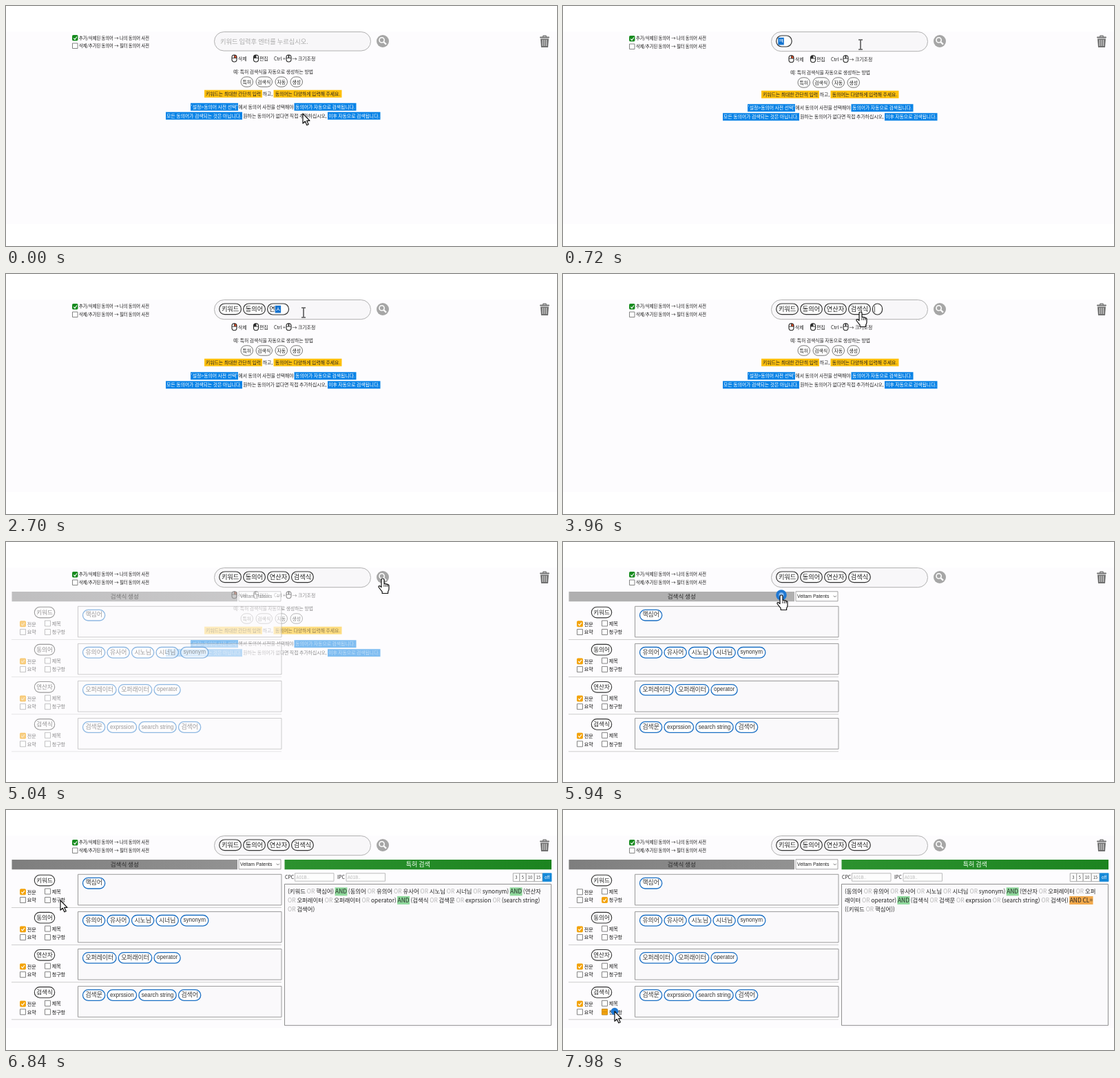
Animation of 800x348 px, one loop 8000 ms. Source, as an HTML page with a canvas:

```html
<!DOCTYPE html>
<html lang="ko">
<head>
<meta charset="utf-8">
<title>검색식 생성</title>
<style>
html, body { margin: 0; width: 100%; height: 100%; overflow: hidden; background: #fff; }
canvas { display: block; width: 800px; height: 348px; }
</style>
</head>
<body>
<canvas id="stage"></canvas>
<script>
const LOOP = 8000;
const KR = '"Noto Sans CJK KR", "Noto Sans CJK", sans-serif';
const ARIAL = '"Liberation Sans", "Noto Sans CJK KR", sans-serif';
const canvas = document.getElementById('stage');
const g = canvas.getContext('2d');
const dpr = window.devicePixelRatio || 1;
canvas.width = 800 * dpr;
canvas.height = 348 * dpr;

// Each word as the states of its syllables while it is typed.
const words = [
  { start: 720, step: 105, keys: 'ㅋ 키 키ㅇ 키우 키워 키워ㄷ 키워드' },
  { start: 1540, step: 100, keys: 'ㄷ 도 동 동ㅇ 동으 동의 동의ㅇ 동의어' },
  { start: 2400, step: 85, keys: 'ㅇ 여 연 연ㅅ 연사 연산 연산ㅈ 연산자' },
  { start: 3140, step: 72, keys: 'ㄱ 거 검 검ㅅ 검새 검색 검색ㅅ 검색시 검색식' }
].map(w => ({ ...w, keys: w.keys.split(' ') }));

const FOCUS = 600, SEARCH = 4600, MAKE = 5800, CLAIM = 6930, LAST = 7920;
const clicks = [[SEARCH, 547, 53], [MAKE, 317, 77], [CLAIM, 79, 131], [LAST, 75, 292]];
const path = [
  [0, 431, 156], [80, 431, 156], [520, 432, 56], [4220, 432, 56], [4540, 547, 54],
  [5120, 547, 54], [5700, 317, 78], [6060, 317, 78], [6760, 79, 131],
  [7180, 79, 131], [7820, 75, 292], [8000, 75, 292]
];

const rows = [
  ['키워드', ['핵심어']],
  ['동의어', ['유의어', '유사어', '시노님', '시너님', 'synonym']],
  ['연산자', ['오퍼레이터', '오퍼래이터', 'operator']],
  ['검색식', ['검색문', 'exprssion', 'search string', '검색어']]
];

const query = [
  '(키워드 OR 핵심어) AND (동의어 OR 유의어 OR 유사어 OR 시노님 OR 시너님 OR synonym) AND (연산자',
  'OR 오퍼레이터 OR 오퍼래이터 OR operator) AND (검색식 OR 검색문 OR exprssion OR (search string)',
  'OR 검색어)'
];
const claimQuery = [
  '(동의어 OR 유의어 OR 유사어 OR 시노님 OR 시너님 OR synonym) AND (연산자 OR 오퍼레이터 OR 오퍼',
  '래이터 OR operator) AND (검색식 OR 검색문 OR exprssion OR (search string) OR 검색어) AND CL=',
  '((키워드 OR 핵심어))'
];

const clamp = v => Math.max(0, Math.min(1, v));
const ramp = (t, a, b) => clamp((t - a) / (b - a));
const ease = v => v * v * (3 - 2 * v);

function setFont(size, family = KR, weight = 400) {
  g.font = `${weight} ${size}px ${family}`;
}

function text(s, x, y, size, { color = '#222', align = 'left', family = KR, weight = 400 } = {}) {
  setFont(size, family, weight);
  g.fillStyle = color;
  g.textAlign = align;
  g.textBaseline = 'middle';
  g.fillText(s, x, y);
}

function box(x, y, w, h, fill, stroke, r = 0, line = 1) {
  g.beginPath();
  g.roundRect(x, y, w, h, r);
  if (fill) { g.fillStyle = fill; g.fill(); }
  if (stroke) { g.strokeStyle = stroke; g.lineWidth = line; g.stroke(); }
}

function lines(points, color, width) {
  g.beginPath();
  points.forEach(([x, y], i) => i ? g.lineTo(x, y) : g.moveTo(x, y));
  g.strokeStyle = color;
  g.lineWidth = width;
  g.stroke();
}

function disc(x, y, r, color) {
  g.beginPath();
  g.arc(x, y, r, 0, 7);
  g.fillStyle = color;
  g.fill();
}

function check(x, y, on, color, size = 8) {
  box(x + .5, y + .5, size, size, on ? color : '#fff', on ? color : '#777', on ? 1 : 0, .9);
  if (on) lines([[x + 2.2, y + 4.6], [x + 4, y + 6.5], [x + 7, y + 2.5]], '#fff', 1.2);
}

function withAlpha(alpha, draw) {
  if (alpha <= 0) return;
  g.save();
  g.globalAlpha = alpha;
  draw();
  g.restore();
}

function drawTop(t) {
  const shift = t < words[0].start ? 0 : 1;
  check(96, 42 + shift, true, '#148a1c', 7.5);
  check(96, 53.5 + shift, false, '', 7.5);
  const bold = { weight: 500, color: '#111' };
  text('추가/삭제된 동의어 → 나의 동의어 사전', 106, 46.3 + shift * .6, 6.25, bold);
  text('삭제/추가된 동의어 → 필터 동의어 사전', 106, 58 + shift * .4, 6.25, bold);

  box(302.5, 37.5, 227, 27.5 + shift * .7, '#f8f7f9', '#a9a9a9', 14, .9);
  if (t < FOCUS) text('키워드 입력후 엔터를 누르십시오.', 311, 51, 9.25, { color: '#aaa' });
  drawKeywords(t);

  disc(547, 51, 9, '#a6a6a6');
  g.beginPath();
  g.arc(545.6, 49.4, 3.6, 0, 7);
  g.strokeStyle = '#fff';
  g.lineWidth = 1.6;
  g.stroke();
  lines([[548.4, 52.2], [552, 55.6]], '#fff', 2.2);
  drawTrash();
}

function drawTrash() {
  const c = '#707070';
  box(775, 44.5, 14, 2, c, null, 1);
  lines([[779.5, 45], [780, 43.2], [784, 43.2], [784.5, 45]], c, 1.2);
  g.beginPath();
  g.moveTo(776, 47.5);
  g.lineTo(788, 47.5);
  g.lineTo(787, 60);
  g.lineTo(777, 60);
  g.fillStyle = c;
  g.fill();
  for (const x of [779.3, 782, 784.7]) lines([[x, 49], [x, 58]], '#f4f4f4', .9);
}

function drawKeywords(t) {
  if (t < FOCUS) return;
  let x = 309.7;
  for (const { start, step, keys } of words) {
    const k = Math.floor((t - start) / step);
    if (k < 0) break;
    const s = keys[Math.min(k, keys.length - 1)];
    setFont(9.2);
    const w = g.measureText(s).width;
    if (k < keys.length + 1) return drawEdit(x, s, w, t);
    box(x, 43, w + 6.4, 15.6, '#fdfdfd', '#333', 7.8, 1.2);
    text(s, x + 3.2, 50.5, 9.2);
    x += w + 9.6;
  }
  if (t < SEARCH) drawEdit(x, '', 0, t);
}

function drawEdit(x, s, w, t) {
  box(x, 43, w + 14, 16, '#fdfdfd', '#333', 7.8, 1.2);
  if (!s) {
    if (t % 1000 < 530 || t > 3800) lines([[x + 3, 46.5], [x + 3, 55.5]], '#333', .8);
    return;
  }
  const last = s.slice(-1);
  const lw = g.measureText(last).width;
  text(s, x + 2.6, 51, 9.2);
  box(x + 2.6 + w - lw, 45.8, lw, 10.6, '#1473cf');
  text(last, x + 2.6 + w - lw, 51, 9.2, { color: '#fff' });
}

function mouse(x, y, part, color) {
  g.save();
  g.beginPath();
  g.roundRect(x, y, 7, 10, 3.4);
  g.clip();
  box(x, y, 7, 10, '#fff');
  if (part === 'left') box(x, y, 3.5, 4.4, color);
  if (part === 'right') box(x + 3.5, y, 3.5, 4.4, color);
  g.restore();
  box(x, y, 7, 10, null, '#222', 3.4, 1.1);
  lines([[x, y + 4.4], [x + 7, y + 4.4]], '#222', .8);
  lines([[x + 3.5, y], [x + 3.5, y + 4.4]], '#222', part === 'wheel' ? 1.6 : .8);
}

function drawHelp(t) {
  const d = t < words[0].start ? 0 : 1;
  const mid = { align: 'center' };
  mouse(328, 71 + d * .7, 'right', '#e0522d');
  text('삭제', 337, 76.3 + d * .7, 6.9);
  mouse(359.5, 71 + d * .7, 'left', '#333');
  text('편집', 368, 76.3 + d * .7, 6.9);
  text('Ctrl +', 389, 76.3 + d * .7, 6.9);
  mouse(407, 71 + d * .7, 'wheel');
  text('→ 크기조정', 415.5, 76.3 + d * .7, 6.9);
  text('예: 특허 검색식을 자동으로 생성하는 방법', 388, 95 + d, 6.8, mid);
  [['특허', 341, 17.5], ['검색식', 363, 23.5], ['자동', 391, 17.5], ['생성', 413, 17.5]].forEach(([s, x, w]) => {
    box(x, 102.8 + d, w, 14.4, '#fdfdfd', '#555', 7.2, .8);
    text(s, x + w / 2, 110 + d, 6.8, mid);
  });
  const mark = (s, x, y, w, fill, color = '#222') => {
    if (fill) box(x, y - 5.5, w, 11, fill);
    text(s, x + w / 2, y, 6.85, { align: 'center', color });
  };
  const y1 = 127.3 + d, y2 = 146.3 + d * 1.5, y3 = 159.3 + d * 1.5;
  const blue = '#0983e6', gold = '#ffc10d';
  mark('키워드는 최대한 간단히 입력', 288, y1, 84, gold);
  mark('하고,', 372, y1, 16);
  mark('동의어는 다양하게 입력해 주세요.', 388.5, y1, 99, gold);
  mark("'설정>동의어 사전 선택'", 268, y2, 69, blue, '#fff');
  mark('에서 동의어 사전을 선택해야', 337, y2, 81);
  mark('동의어가 자동으로 검색됩니다.', 418.5, y2, 90, blue, '#fff');
  mark('모든 동의어가 검색되는 것은 아닙니다.', 232, y3, 111, blue, '#fff');
  mark('원하는 동의어가 없다면 직접 추가하십시오,', 344, y3, 122);
  mark('이후 자동으로 검색됩니다.', 467, y3, 76.5, blue, '#fff');
}

function drawHeader(x, w, from, to, label, color, size) {
  const grad = g.createLinearGradient(x, 0, x + w, 0);
  grad.addColorStop(0, from);
  grad.addColorStop(1, to);
  box(x, 72, w, 14.3, grad);
  text(label, x + w / 2, 79, size, { align: 'center', color });
}

function drawRow(i, t) {
  const [name, chips] = rows[i];
  const y = 54.1 * i;
  box(41.3, 94.3 + y, 29.4, 15.6, '#fff', '#333', 7.8, 1.1);
  text(name, 56, 101.8 + y, 8.5, { align: 'center' });
  const claimed = i === 0 && t >= CLAIM + 110;
  const pending = i === 3 && t >= LAST + 30;
  const opts = [['전문', 20, 114.3, !claimed], ['제목', 56, 113.5, false],
    ['요약', 20, 126, false], ['청구항', 56, 126, claimed]];
  for (const [s, x, cy, on] of opts) {
    check(x, cy + y, on, '#f3a30b');
    text(s, x + 10.7, cy + 4.6 + y, 7, { weight: 500, color: '#111' });
  }
  if (pending) {
    box(56.5, 126.5 + y, 8, 8, '#f3a30b', '#d98f05', 0, .9);
    for (const x of [58.5, 60.5, 62.5]) disc(x, 130.5 + y, .5, '#8a6420');
  }
  box(104.5, 93.3 + y, 295.5, 44.6, '#faf9fb', '#9a9a9a', 0, 1);
  let x = 111.5;
  for (const s of chips) {
    const size = /[a-z]/.test(s) ? 8.15 : 8.85;
    setFont(size, ARIAL);
    const w = g.measureText(s).width + 7.8;
    box(x, 98.4 + y, w, 15.6, '#fff', '#1a6fc4', 7.8, 1.3);
    text(s, x + 3.9, 106 + y, size, { family: ARIAL, color: '#333' });
    x += w + 3.3;
  }
  lines([[8, 141.5 + y], [400, 141.5 + y]], '#c9c9c9', .9);
}

function drawLeft(t) {
  const hover = ramp(t, 5640, 5760) * (1 - ramp(t, 6100, 6250));
  const tone = v => { const c = Math.round(v + (176 - v) * hover); return `rgb(${c},${c},${c})`; };
  drawHeader(8.5, 327.5, tone(126), tone(146), '검색식 생성', '#2a2a2a', 8.5);
  box(338, 71.8, 61, 14, '#fff', '#999', 0, .9);
  text('Veltam Patents', 340, 78.6, 6.9, { family: ARIAL });
  lines([[392.8, 77.8], [394.8, 79.8], [396.8, 77.8]], '#555', .8);
  rows.forEach((_, i) => drawRow(i, t));
}

function drawQuery(s, x, y) {
  for (const part of s.split(/(AND CL=|AND|OR)/)) {
    setFont(8.4, KR, 500);
    const w = g.measureText(part).width;
    if (part.startsWith('AND')) box(x - .5, y - 6, w + 1, 12, part === 'AND' ? '#8fd99c' : '#f2a94c');
    text(part, x, y, 8.4, part === 'OR' ? { color: '#b4b4b4' } : { weight: 500 });
    x += w;
  }
}

function drawRight(t) {
  drawHeader(404.5, 387.5, '#2c922f', '#1c8420', '특허 검색', '#f2fff2', 9);
  [['CPC', 405, 419.5], ['IPC', 481, 494]].forEach(([s, x, fx]) => {
    text(s, x, 97, 6.9);
    box(fx, 91.8, 56.5, 11.4, '#fdfdfd', '#b5b5b5', 0, .9);
    text('A01B..', fx + 2, 97.2, 6.4, { color: '#b5b5b5' });
  });
  [['3', 736, 9.5], ['5', 745.5, 9.5], ['10', 755, 12], ['15', 767, 12], ['off', 779, 13]].forEach(([s, x, w]) => {
    const on = s === 'off';
    box(x + .3, 91.8, w - .3, 11.8, on ? '#1488d8' : '#fff', on ? '#1488d8' : '#999', 0, .8);
    text(s, x + w / 2, 97.6, 5.8, { align: 'center', color: on ? '#fff' : '#333' });
  });
  box(404.5, 107.5, 387, 204.8, '#fbfafc', '#8f8f8f', 0, 1);
  (t < CLAIM + 200 ? query : claimQuery).forEach((s, i) => drawQuery(s, 409, 118.3 + 12.6 * i));
}

function cursorAt(t) {
  const i = path.findIndex(p => p[0] > t);
  const [t0, x0, y0] = path[i - 1], [t1, x1, y1] = path[i];
  const k = ease(ramp(t, t0, t1));
  return [x0 + (x1 - x0) * k, y0 + (y1 - y0) * k];
}

function cursorKind(t, x, y) {
  const inside = (l, top, r, b) => x >= l && x <= r && y >= top && y <= b;
  if (inside(538, 42, 556, 60)) return 'hand';
  if (t > SEARCH && inside(8, 72, 336, 86)) return 'hand';
  if (t > 3860 && inside(414, 43, 446, 59)) return 'hand';
  return inside(303, 38, 529, 65) ? 'beam' : 'arrow';
}

const shapes = {
  arrow: new Path2D('M0 0V14.2L3.3 11.2L5.8 16.8L8.2 15.7L5.7 10.3H10Z'),
  hand: new Path2D('M-2 1Q-2-1 0-1Q2-1 2 1V7Q3.5 5.8 4.7 7.2Q6.2 6.2 7 8Q9 7.3 9 9.6V14Q9 16 7.6 18V20.5H-.8V18.2L-5.6 12Q-6.7 10-5 9.6Q-3.8 9.4-2 11.6Z')
};

function drawCursor(t) {
  const [x, y] = cursorAt(t);
  const kind = cursorKind(t, x, y);
  if (kind === 'beam') {
    lines([[x, y - 6.5], [x, y + 6.5]], '#222', 1.2);
    for (const e of [-7, 7]) lines([[x - 3, y + e], [x + 3, y + e]], '#222', 1.1);
    return;
  }
  g.save();
  g.translate(x, y);
  g.fillStyle = '#fff';
  g.fill(shapes[kind]);
  g.strokeStyle = '#111';
  g.lineWidth = 1.2;
  g.lineJoin = 'round';
  g.stroke(shapes[kind]);
  if (kind === 'hand') for (const hx of [2, 4.6, 7]) lines([[hx, 8], [hx, 11]], '#111', .9);
  g.restore();
}

function drawClicks(t) {
  for (const [start, x, y] of clicks) {
    const age = (t - start) / 280;
    if (age < 0 || age > 1) continue;
    withAlpha(1 - ramp(age, .6, 1), () => {
      disc(x, y, 3.5 + 8.5 * age, '#1f78d2');
      if (age > .3) disc(x, y, 8 * (age - .3) + 2, '#8dbdf0');
    });
  }
}

function draw(t) {
  g.setTransform(dpr, 0, 0, dpr, 0, 0);
  g.fillStyle = '#fff';
  g.fillRect(0, 0, 800, 348);
  g.fillStyle = '#fdfcfe';
  g.fillRect(0, 37, 800, 279);
  const shown = ramp(t, 4700, 5400);
  withAlpha(1 - shown, () => drawHelp(t));
  withAlpha(shown, () => drawLeft(t));
  withAlpha(ramp(t, 6100, 6700), () => drawRight(t));
  drawTop(t);
  drawClicks(t);
  drawCursor(t);
}

const origin = performance.now();
function tick() {
  draw((performance.now() - origin) % LOOP);
  requestAnimationFrame(tick);
}
tick();
</script>
</body>
</html>
```
